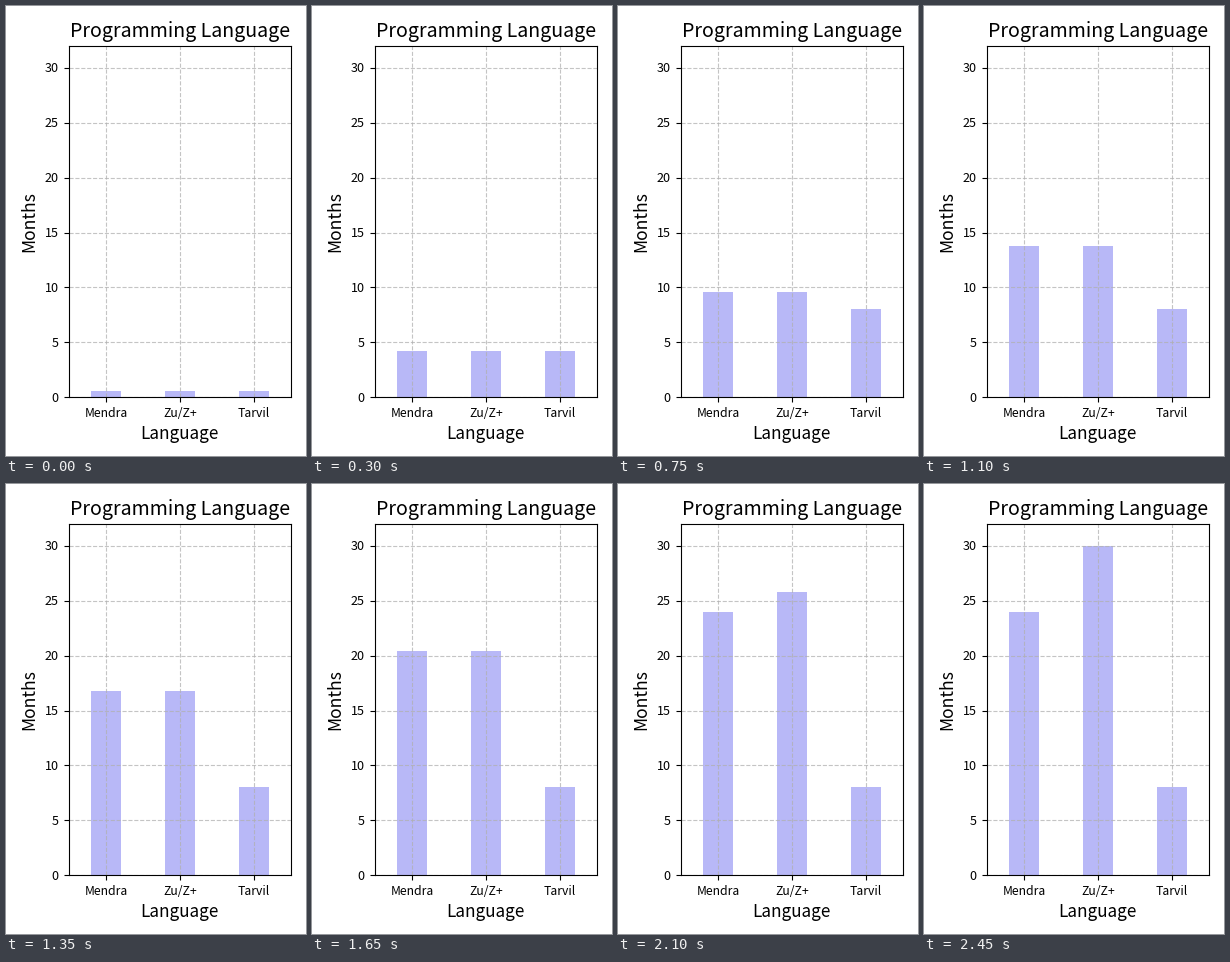
Recreate the animation shown at these times as a matplotlib script. Size 300 by 450 pixels, loop 2500 ms.

```python
import matplotlib.pyplot as plt
from matplotlib.animation import FuncAnimation

W, H, DPI = 300, 450, 100
FRAMES, INTERVAL = 50, 50
STEP = 0.6  # months gained per frame

LANGUAGES = ["Mendra", "Zu/Z+", "Tarvil"]
MONTHS = [24, 30, 8]

LEFT, RIGHT, TOP, BOTTOM = 63.1, 285.1, 39.92, 391.22
Y_MAX = 32

plt.rcParams["font.family"] = "Noto Sans CJK JP"

fig = plt.figure(figsize=(W / DPI, H / DPI), dpi=DPI, facecolor="white")
ax = fig.add_axes([LEFT / W, 1 - BOTTOM / H,
                   (RIGHT - LEFT) / W, (BOTTOM - TOP) / H])
ax.set_xlim(-0.5, 2.5)
ax.set_ylim(0, Y_MAX)
ax.set_xticks(range(3))
ax.set_yticks(range(0, 31, 5))
ax.tick_params(labelbottom=False, labelleft=False)
ax.grid(True, linestyle="--", color="#b0b0b0", alpha=0.75, zorder=1.5)


def label(x, y, text, size, ha="center", rotation=0):
    """Place text by its baseline, in pixels from the top left."""
    fig.text(x / W, 1 - y / H, text, fontsize=size, ha=ha, va="baseline",
             rotation=rotation, rotation_mode="anchor", color="black")


label(174, 31, "Programming Language", 14.1)
label(173, 433, "Language", 12.3)
label(28, 215.5, "Months", 12.6, rotation=90)
for i, name in enumerate(LANGUAGES):
    label(100 + 74 * i, 411, name, 8.8)
for value in range(0, 31, 5):
    y = BOTTOM - value * (BOTTOM - TOP) / Y_MAX
    label(52.6, y + 4.4, str(value), 9.1, ha="right")

bars = ax.bar(range(3), [0] * 3, width=0.4, color="#b8b8f7", zorder=1)


def update(frame):
    for bar, months in zip(bars, MONTHS):
        bar.set_height(min(STEP * (frame + 1), months))
    return bars


anim = FuncAnimation(fig, update, frames=FRAMES, interval=INTERVAL,
                     init_func=lambda: update(0), repeat=True, repeat_delay=0)
plt.show()
```
